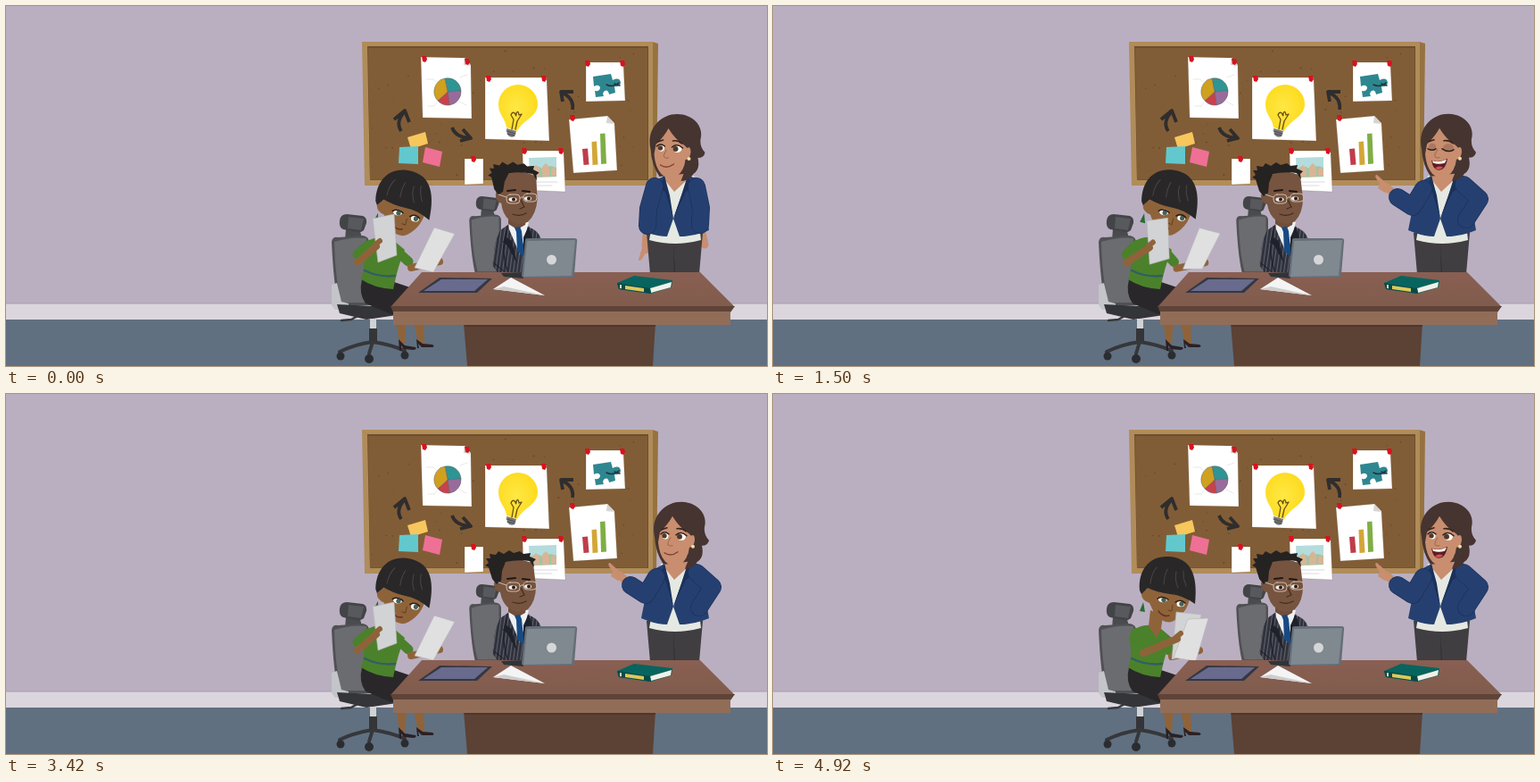
These frames come from a looping animation (853x403 px, 5.01 s). An HTML page:

```html
<!DOCTYPE html>
<html lang="en">
<head>
<meta charset="utf-8">
<title>Team meeting</title>
<style>
html, body { margin: 0; width: 100%; height: 100%; overflow: hidden; background: #baafc1; }
svg { display: block; width: 853px; height: 403px; }
.line { fill: none; stroke-linecap: round; stroke-linejoin: round; }
.paper { fill: #fff; stroke: #64482b; stroke-opacity: .3; stroke-width: .7; }
.sheet { fill: #e0e0e1; stroke: #b4b6b8; stroke-width: .6; }
#sheet1 { fill: #d2d3d5; }
.brown { fill: #8f633a; }
.tan { fill: #c88e6f; }
.arrow { stroke: #302d2d; stroke-width: 3.8; stroke-linecap: butt; }
</style>
</head>
<body>
<svg viewBox="0 0 853 403">
<defs>
  <radialGradient id="glow" cx=".45" cy=".5"><stop stop-color="#ffe845"/><stop offset="1" stop-color="#fddc22"/></radialGradient>
  <linearGradient id="wood" x2="0" y2="1"><stop stop-color="#895f52"/><stop offset="1" stop-color="#805c4d"/></linearGradient>
  <pattern id="stripe" width="4" height="8" patternUnits="userSpaceOnUse" patternTransform="rotate(8)">
    <path fill="#30323c" d="M0 0h4v8h-4z"/><path fill="#777b88" d="M0 0h.7v8h-.7z"/>
  </pattern>
  <g id="chair">
    <path fill="#4a4b4e" d="M381 249h15l4 14h-20z"/>
    <path fill="#434447" d="M374 240Q375 233 382 233L400 235Q405 237 404 243L401 251Q398 254 393 253L378 250Q373 248 374 240z"/>
    <path fill="#58595c" d="M384 236l17 2-3 13-15-2z"/>
    <path fill="#505154" d="M365 264Q366 258 372 259L400 257Q407 258 407 265L407 335L373 336Q367 311 365 264z"/>
    <path fill="#6b6c6f" d="M368 264Q388 258 404 260L405 332L376 332Q369 306 368 264z"/>
  </g>
</defs>

<!-- room -->
<path fill="#baafc1" d="M0 0h853v403H0z"/>
<path fill="#dbd6de" d="M0 333h853v19H0z"/>
<path fill="#a79daf" d="M0 332.5h853v1H0z"/>
<path fill="#607080" d="M0 351h853v52H0z"/>

<!-- cork board -->
<path fill="#96723f" d="M724 40L731 42L729 201H724z"/>
<path fill="#b08c5a" d="M399 40H725V201H402z"/>
<path fill="#6f4e2c" d="M405 45H720V195H408z"/>
<path fill="#815d37" d="M406 47H719V194.500H408z"/>
<g id="specks" fill="#66482a"></g>
<g class="paper">
  <path d="M465 57L514 58L521 66L522 126L467 125z"/>
  <path d="M537 80L606 80L609 151L537 149z"/>
  <path d="M650 63L692 63L694 106L650 107z"/>
  <path d="M631 127L674 123L682 131L685 184L636 187z"/>
  <path d="M579 162L625 162L627 208L580 206z"/>
  <path d="M514 171H535V199L514 200z"/>
</g>
<path fill="#d5d3d4" d="M514 58l-1 8 8 1zM674 123l-1 8 9 1z"/>
<g transform="translate(495 96)" stroke="#5c5c5c" stroke-width=".5">
  <path fill="#2f9494" d="M0 0L-3 -15A15 15 0 0 1 15 -1z"/>
  <path fill="#996b9b" d="M0 0L15 -1A15 15 0 0 1 2 15z"/>
  <path fill="#c8414b" d="M0 0L2 15A15 15 0 0 1 -11 10z"/>
  <path fill="#d0a01f" d="M0 0L-11 10A15 15 0 0 1 -3 -15z"/>
</g>
<path class="line" stroke="#e2e2e5" stroke-width=".8" d="M471 82h8l3 3M509 80l8-3M473 112h7l3-4M508 107l8 4"/>
<path fill="url(#glow)" d="M561 136C560 126 552 122 552 110A22 22 0 0 1 596 110C596 124 580 127 573 140z"/>
<path class="line" stroke="#6b4d17" stroke-width="1.300" d="M567 138L569 127L566 122Q568 117 571 121Q572 125 572 120Q574 116 575 122L578 121L573 129L571 138"/>
<path fill="#77777a" d="M561 137l11 3-2 6q-5 2-8-2z"/>
<path class="line" stroke="#4c4c4f" d="M561 140l10 3M562 143l8 2"/>
<path fill="#2e8790" d="M658 79L678 76L680 83Q688 79 689 86Q688 91 682 90L683 97L676 99Q675 93 671 95Q668 97 670 101L661 102L660 95Q666 96 666 91Q664 87 659 90z"/>
<path class="line" stroke="#263238" stroke-width="1.500" d="M673 88q7 4 14-2M682 87l6 2"/>
<path fill="#bf3d4b" d="M646 160l6-.5 1.500 18-6 .5z"/>
<path fill="#d3a637" d="M656.500 152l5.500-.5 1.500 26-6 .4z"/>
<path fill="#7fae45" d="M666 143l5.500-.5 1.500 34-6 .5z"/>
<path fill="#b5dcdc" d="M586 170L617 169L617 191L587 192z"/>
<path fill="#9fc5a2" d="M586 184q8-8 15-2 8-5 16-1v10l-30 1z"/>
<path fill="#d8b596" d="M590 191v-9l4-4 4 4v9zM601 191v-11l4-4 4 4v11zM611 190v-7l3-3 3 3v7z"/>
<path class="line" stroke="#dadadd" d="M587 197h31M587 201h25"/>
<path fill="#f7c65c" d="M450 147L470 141L473 154L454 160z"/>
<path fill="#62c8cd" d="M441 158L462 157V177L440 176z"/>
<path fill="#ee7095" d="M470 158L489 163L486 180L467 175z"/>
<g id="pins" fill="#d7131f"></g>
<g class="line arrow">
  <path d="M443 140Q436 130 447 118M435 127L447 117L452 130"/>
  <path d="M500 136Q504 147 520 148M512 138L521 148L509 151"/>
  <path d="M635 116Q637 103 623 97M624 107L622 96L636 96"/>
</g>

<!-- standing woman -->
<g>
  <g id="hands" class="line" stroke="#c88e6f" stroke-width="9"><path/><path/></g>
  <path class="tan" id="finger" d="M687 198L677 189Q674 189 676 193L680 199L678 204L686 209L694 205z"/>
  <path fill="#403e40" d="M718 254H781L777 300H722z"/>
  <path fill="#2d2b2e" d="M748 266l2 34h-1z"/>
  <path fill="#e5e9e2" d="M734 190H771L779 262Q750 270 721 262z"/>
  <path class="tan" d="M740 180H763V195L749 208L738 194z"/>
  <path fill="#254070" d="M738 190L727 196Q714 210 716 231L712 251Q728 258 741 258L748 238z"/>
  <path fill="#254070" d="M765 190L777 194Q787 204 784 228L788 251Q772 258 755 258L748 238z"/>
  <path fill="#1c315b" d="M738 190L732 205L739 208L748 238L744 212zM764 190L769 204L762 208L748 238L757 212z"/>
  <g id="sleeves" class="line"><path/><path/><path/><path/></g>
</g>
<g id="standingHead">
  <path fill="#463430" d="M727 160C722 139 737 121 757 121C774 121 787 134 783 149Q782 158 788 164Q787 170 780 170Q783 183 775 188Q770 196 761 196L764 188L737 191Q728 178 727 160z"/>
  <path class="tan" d="M733 155Q743 145 747 137Q755 150 765 156L768 159Q772 156 772 164Q771 172 766 172Q765 184 756 191Q747 195 739 188Q732 180 731 166z"/>
  <path class="line" stroke="#36251f" stroke-width="1.600" d="M735 152l6-2M752 151q6-1 10 3"/>
  <path class="line" stroke="#9f6449" d="M745 161q-4 6-3 8 2 2 5 1"/>
  <circle cx="770" cy="171" r="2" fill="#efdfaa"/>
  <g id="openEyes">
    <ellipse cx="739" cy="159" rx="3.500" ry="3.800" fill="#fff"/><ellipse cx="757" cy="160" rx="5" ry="4" fill="#fff"/>
    <circle cx="738" cy="159" r="2.700" fill="#513727"/><circle cx="755" cy="160" r="3" fill="#513727"/>
    <path class="line" stroke="#2d211e" stroke-width="1.500" d="M734 157q4-4 9 0M751 158q6-5 12 1"/>
  </g>
  <g id="shutEyes">
    <ellipse cx="739" cy="158" rx="4" ry="4" fill="#a9785f"/><ellipse cx="757" cy="159" rx="6" ry="4.500" fill="#a9785f"/>
    <path class="line" stroke="#2d211e" stroke-width="1.500" d="M734 160q5 3 9 0M750 160q7 5 13 1"/>
  </g>
  <path id="smile" class="line" stroke="#873f36" stroke-width="1.400" d="M738 178q7 5 15-1"/>
  <g id="talk">
    <path fill="#611d22" d="M738 173Q747 176 756 171Q754 184 746 184Q740 184 738 173z"/>
    <path fill="#fff" d="M739 173.500Q747 176 755 172L753 176Q746 178 740 176z"/>
    <path fill="#c95658" d="M742 182q4-4 9-1-4 4-9 1z"/>
  </g>
</g>

<!-- seated man -->
<use href="#chair" transform="translate(209 15) scale(.85)"/>
<path fill="url(#stripe)" d="M564 244L554 251Q547 264 547 278L545 290L552 300H601V268Q600 251 584 247z"/>
<path fill="#eef0f2" d="M563 240L586 242L582 257L576 278L564 250z"/>
<path fill="#6f4e3b" d="M563 233h21l-2 12-9 5-10-6z"/>
<path fill="#174a83" d="M570 248l6-1 2 5 3 29-8-6-1-22z"/>
<path fill="#20222b" d="M563 244l-2 15 6 4 6 26-11-21-5-3zM586 246l4 14-6 6-4 23 0-30z"/>
<path class="line" stroke="#191b22" d="M558 267q-1 15 4 29M547 288l10 8"/>
<g id="manHead">
  <path fill="#76543f" d="M555 192Q573 181 591 190L594 215Q594 232 585 241Q575 247 564 240Q556 234 554 222Q547 221 547 212Q548 207 554 209z"/>
  <path fill="#252222" d="M550 213L545 207L541 194L537 192L541 189L538 184L543 184L542 179L549 180L552 176L558 179L564 175L569 178L576 176L580 179L588 178L587 182L594 185L591 188L592 194L587 187Q573 185 560 188L556 198L555 209z"/>
</g>
<path class="line" stroke="#211713" stroke-width="2" d="M562 207l9-1M579 207l8 1"/>
<g fill="#eee"><ellipse cx="568" cy="216.500" rx="4.500" ry="2.300"/><ellipse cx="585" cy="215.500" rx="4" ry="2.300"/></g>
<g fill="#2d1b13"><circle cx="569" cy="216.500" r="2"/><circle cx="586" cy="215.500" r="2"/></g>
<g class="line" stroke="#cdb9a9"><rect x="561" y="211" width="15" height="10" rx="4"/><rect x="580" y="210" width="15" height="9" rx="4"/><path d="M576 215q2-2 4-1M552 211l9 3"/></g>
<path class="line" stroke="#432a1e" stroke-width="1.200" d="M577 217l4 8-5 2M568 233q8 3 15-1"/>

<!-- seated woman -->
<use href="#chair"/>
<path fill="#c3c5c8" d="M365 312l6-2 5 21 8 2v6l-15 1-4-5z"/>
<path fill="#343538" d="M371 334L434 337L438 346L404 351L374 344z"/>
<path class="line" stroke="#38393c" stroke-width="2.500" d="M376 352l11-1 9-5"/>
<path fill="#d0d2d5" d="M408 350h7v13h-7z"/><path fill="#343538" d="M407 361h9v16h-9z"/>
<path class="line" stroke="#36373b" stroke-width="4" d="M411 376Q390 379 374 387M411 376Q432 379 447 386M411 376L407 389"/>
<g fill="#2b2c30"><circle cx="375" cy="392" r="4.500"/><circle cx="407" cy="395" r="5"/><circle cx="447" cy="391" r="4.500"/></g>
<path class="brown" d="M437 350L449 350L447 378L441 378zM456 350H468L469 378L462 378z"/>
<path fill="#2b2024" d="M440 373l7 7 12 2q2 2-2 3l-11-1-3-4 0 6h-2zM460 373l7 5 11 1q3 2 0 3l-12 0-4-4 1 5h-2z"/>
<path fill="#2a272a" d="M399 306L435 309L465 319V345H432L403 333Q395 322 399 306z"/>
<g id="backArm" class="line"><path/><path/></g>
<path fill="#4b812b" d="M405 263Q421 255 434 262L447 273Q440 288 434 317Q413 316 398 306Q404 291 399 272z"/>
<path class="line" stroke="#315d68" stroke-width="2.500" d="M402 296q16 8 34 6"/>
<path class="brown" d="M423 242L437 248L435 263L430 273L421 260z"/>
<g id="seatedHead">
  <path fill="#286b32" d="M413 233l-4 10 6 1z"/>
  <path class="brown" d="M417 210L466 222Q465 242 449 253Q439 260 426 247L420 234Q410 231 411 222Q412 216 417 219z"/>
  <path fill="#292728" d="M409 220C407 197 420 181 441 182C464 183 475 199 471 235Q457 225 443 224Q428 222 418 217L411 224z"/>
  <path class="line" stroke="#4a4648" d="M428 194q-6 7-7 18M440 196q-4 8-4 17M450 199q-2 9 2 18M458 198q-1 8 3 17"/>
  <g fill="#fff"><ellipse cx="435" cy="230" rx="5" ry="3.300"/><ellipse cx="455" cy="235" rx="4.500" ry="3.300"/></g>
  <g fill="#456259"><circle cx="436" cy="230.500" r="2.700"/><circle cx="456" cy="235" r="2.700"/></g>
  <path class="line" stroke="#2d1d18" stroke-width="1.500" d="M429 229q6-4 12 1M449 233q6-4 11 1"/>
  <path class="line" stroke="#65401f" d="M446 236l-1 7-4-1"/>
  <path class="line" stroke="#6b2e24" stroke-width="1.500" d="M430 243q5 7 12 5"/>
</g>
<path class="sheet" id="sheet1"/>
<path class="sheet" id="sheet2"/>
<g id="frontArm" class="line"><path/><path/><path/></g>

<!-- table -->
<path fill="#5c4135" d="M513 355H728L725 403H517z"/>
<path fill="#4f372e" d="M513 356H728V359H514z"/>
<path fill="url(#wood)" d="M466 298H778L817 337H431z"/>
<path fill="#5f4337" d="M431 336H817L812 343H434z"/>
<path fill="#916d58" d="M434 342H812V357H434z"/>
<path fill="#343743" d="M486 304L545 305L528 321L462 321z"/>
<path fill="#686b8d" d="M488 306L540 306L525 319L468 319z"/>
<path fill="#f4f4f4" d="M546 317L566 304L604 324z"/><path fill="#cecccc" d="M546 317L558 314L604 324z"/>
<path fill="#2f343a" d="M555 299L580 298V305L558 303z"/>
<path fill="#656e77" d="M582 262Q582 260 585 260L637 260Q641 260 640 264L637 301Q637 304 633 304H581Q578 304 578 301z"/>
<path fill="#808890" d="M584 263L638 262L634 302L580 303z"/>
<circle cx="611.500" cy="284" r="5.500" fill="#d4d6d8"/>
<path fill="#08645f" d="M685 310L704 302L747 307L746 315L722 322L687 317z"/>
<path fill="#f1f1e8" d="M722 316L746 309L745 315L723 321z"/>
<path fill="#074b48" d="M685 310L722 316L723 322L687 317z"/>
<path fill="#ddc95a" d="M694 313l21 3v4l-21-3z"/><path fill="#d6d6bf" d="M688 312l2 .3v4l-2-.3z"/>
</svg>
<script>
const $ = id => document.getElementById(id);
const LOOP = 5010, STEP = 83.5;
const svgNS = 'http://www.w3.org/2000/svg';

function add(parent, tag, attrs) {
  const el = document.createElementNS(svgNS, tag);
  for (const key in attrs) el.setAttribute(key, attrs[key]);
  parent.append(el);
}
let seed = 7;
const random = () => (seed = seed * 16807 % 2147483647) / 2147483647;
for (let i = 0; i < 75; i++)
  add($('specks'), 'circle', { cx: 410 + random() * 306, cy: 50 + random() * 141, r: .4 + random() * .6 });
for (const [x, y] of [[469, 59], [517, 62], [541, 81], [603, 81], [652, 64], [691, 64], [635, 125], [581, 162], [622, 162], [524, 171]])
  add($('pins'), 'path', { d: `M${x - 3} ${y - 3}l5 0 1 4-2 3-3-1z` });

// Head offset and angle; front elbow, hand; back elbow, hand; both sheets.
const reading = [2, 1, 6, 394, 287, 415, 269, 454, 293, 486, 286,
  411, 238, 435, 233, 438, 279, 417, 287, 480, 248, 503, 255, 479, 298, 458, 293];
const together = [0, 0, 0, 405, 288, 447, 276, 447, 296, 478, 292,
  448, 250, 470, 253, 467, 297, 441, 297, 470, 250, 495, 253, 489, 280, 465, 300];
const parting = [2, 1, 1, 404, 289, 431, 270, 450, 293, 487, 286,
  433, 239, 456, 238, 449, 280, 427, 283, 476, 250, 497, 254, 475, 298, 456, 294];
const stacked = [2, 0, 0, 415, 290, 453, 274, 447, 294, 478, 287,
  452, 244, 480, 247, 474, 290, 447, 297, 465, 252, 488, 251, 474, 299, 449, 295];
const seatedKeys = [[0, reading], [1300, reading], [1700, together], [2250, together],
  [2420, parting], [2670, reading], [4250, reading], [4680, stacked], [LOOP, stacked]];

// Left shoulder, elbow, wrist, hand; then the right arm.
const armsDown = [727, 202, 720, 227, 719, 246, 717, 268, 774, 202, 779, 226, 778, 245, 783, 267];
const pointing = [729, 205, 717, 225, 700, 214, 688, 203, 774, 200, 792, 216, 777, 239, 765, 245];
const armKeys = [[0, armsDown], [160, armsDown], [600, pointing], [LOOP, pointing]];
const blinks = [[1330, 1500], [2080, 2250], [3080, 3250], [4090, 4260]];

const ease = x => x * x * (3 - 2 * x);
function poseAt(keys, t) {
  let i = 0;
  while (t >= keys[i + 1][0]) i++;
  const [t0, from] = keys[i], [t1, to] = keys[i + 1];
  const k = ease((t - t0) / (t1 - t0));
  return from.map((v, n) => v + (to[n] - v) * k);
}
const path = (el, points, close = '') => el.setAttribute('d', 'M' + points.join(' ') + close);
function stroke(el, points, color, width) {
  path(el, points);
  el.setAttribute('stroke', color);
  el.setAttribute('stroke-width', width);
}
const show = (id, on) => $(id).style.display = on ? '' : 'none';

function drawSeated(t) {
  const p = poseAt(seatedKeys, t);
  $('seatedHead').setAttribute('transform', `translate(${p[0]} ${p[1]}) rotate(${p[2]} 435 250)`);
  const [elbow, hand, backElbow, backHand] = [3, 5, 7, 9].map(i => p.slice(i, i + 2));
  const green = '#4b812b', skin = '#8f633a';
  const [sleeve, forearm, fingers] = $('frontArm').children;
  stroke(sleeve, [406, 268, elbow[0], elbow[1] - 9], green, 11);
  stroke(forearm, [...elbow, ...hand], skin, 8);
  stroke(fingers, [hand[0] - 1, hand[1] - 2, hand[0] + 4, hand[1] - 6], skin, 6);
  const [backSleeve, backForearm] = $('backArm').children;
  stroke(backForearm, [...backElbow, ...backHand], skin, 8);
  stroke(backSleeve, [441, 277, backElbow[0] - 3, backElbow[1] - 7], green, 11);
  path($('sheet1'), p.slice(11, 19), 'z');
  path($('sheet2'), p.slice(19), 'z');
}

function drawStanding(t) {
  const p = poseAt(armKeys, t);
  const raised = (p[6] - armsDown[6]) / (pointing[6] - armsDown[6]);
  const hands = $('hands').children, sleeves = $('sleeves').children;
  for (const side of [0, 1]) {
    const arm = p.slice(side * 8, side * 8 + 8);
    path(hands[side], arm.slice(4));
    stroke(sleeves[side * 2], arm.slice(0, 6), '#1c315b', 20);
    stroke(sleeves[side * 2 + 1], arm.slice(0, 6), '#254070', 18.5);
  }
  $('finger').setAttribute('transform', `translate(${p[6] - 688} ${p[7] - 203}) rotate(${-115 * (1 - raised)} 688 203)`);
  $('standingHead').setAttribute('transform', `translate(${-4.5 * (1 - raised)} ${-raised * .2})`);
  $('manHead').setAttribute('transform', `rotate(${4 * (1 - raised)} 574 238)`);

  const talking = t > 450 && t < 1720 || t > 3620;
  const open = talking && Math.floor((t + 40) / 167) % 4 !== 3;
  const shut = blinks.some(([from, to]) => t >= from && t < to);
  show('talk', open);
  show('smile', !open);
  show('openEyes', !shut);
  show('shutEyes', shut);
}

function frame() {
  const t = Math.floor(performance.now() % LOOP / STEP + .02) * STEP % LOOP;
  drawSeated(t);
  drawStanding(t);
  requestAnimationFrame(frame);
}
frame();
</script>
</body>
</html>
```
